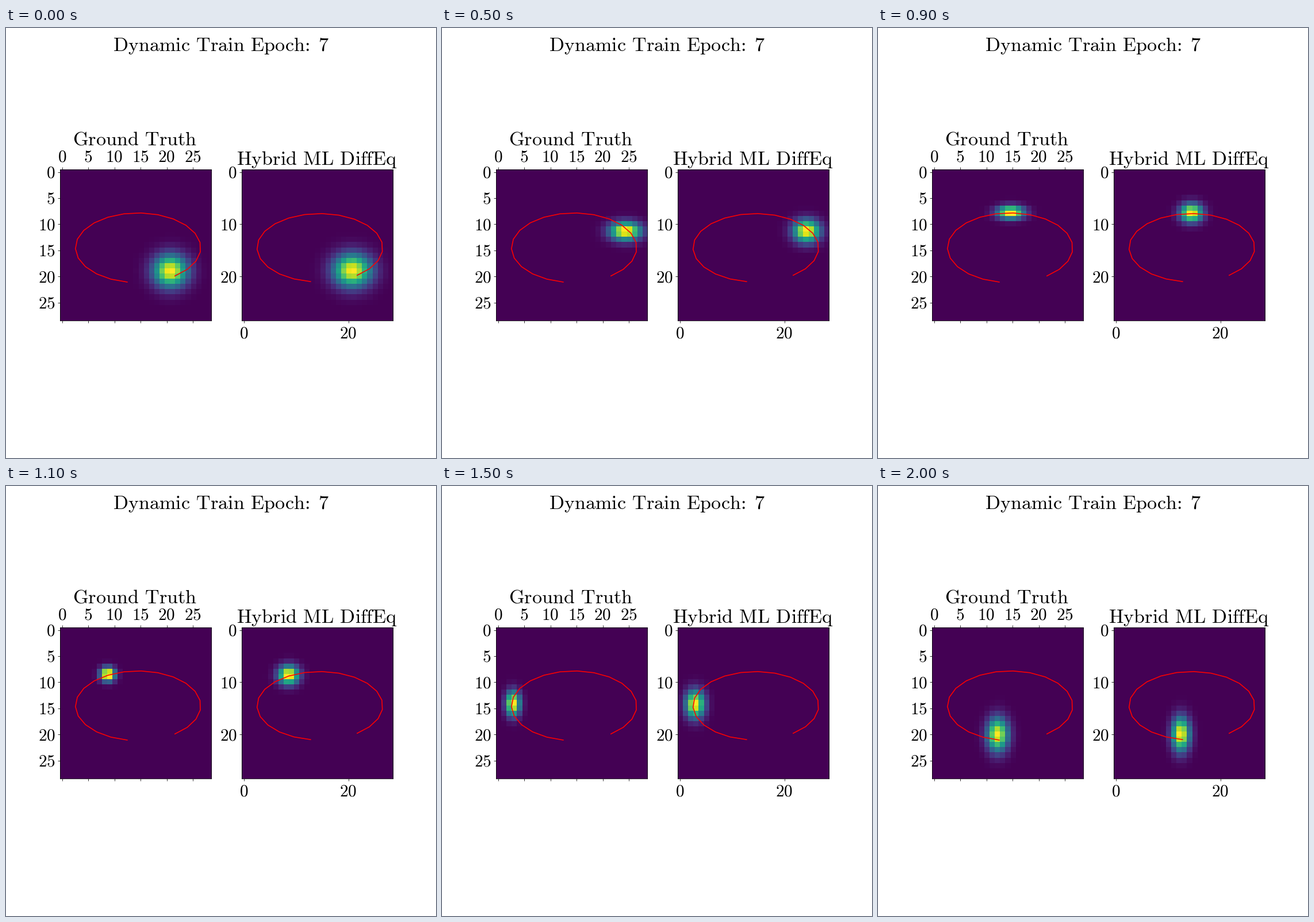
A matplotlib script for the animation above (2100 ms loop, 748 px wide and 748 px high).

```python
import numpy as np
import matplotlib.pyplot as plt
from matplotlib.animation import FuncAnimation

plt.rcParams["mathtext.fontset"] = "cm"

SIZE, DPI = 748, 72
FRAMES, INTERVAL = 21, 100
N = 29                      # grid cells per side
CELL = 9.085                # cell size in pixels
TOP = 246.0                 # upper edge of both panels
LEFTS = (93.5, 409.7)       # left edges of the panels
SIDE = N * CELL
TITLE, TICK = 34.2, 29.3    # font sizes

fig = plt.figure(figsize=(SIZE / DPI, SIZE / DPI), dpi=DPI, facecolor="white")


def label(x, y, text, size, ha="center"):
    """Roman text with its baseline at pixel (x, y)."""
    text = text.replace(":  ", r"\hspace{-0.2}:\hspace{0.306}")
    text = text.replace(" ", r"\hspace{0.38}")
    fig.text(x / SIZE, 1 - y / SIZE, rf"$\mathrm{{{text}}}$",
             fontsize=size, ha=ha, va="baseline")


def wave(pos, mean, amp, low, period):
    return mean - amp * np.cos(2 * np.pi * (pos - low) / period)


def orbit(angle, centre, a, b):
    return centre + a * np.cos(angle), centre - b * np.sin(angle)


def blob(x, y, sx, sy):
    g = np.arange(N)
    z = np.outer(np.exp(-((g - y) / sy) ** 2 / 2),
                 np.exp(-((g - x) / sx) ** 2 / 2))
    return z / z.max()


def truth(i):
    x, y = orbit(truth_angles[i], 14, 11.25, 6.2)
    return blob(x, y, wave(x, 1.52, 0.72, 5.5, 30), wave(y, 1.5, 0.7, 6, 30))


def hybrid(i):
    x, y = orbit(hybrid_angles[i], 14, 11.2, 6.1)
    return blob(x, y, 1.1 + 1.4 * np.exp(-i / 6.3), wave(y, 1.7, 0.52, 6.5, 28))


def panel(left, angles, a, b, xticks, yticks):
    ax = fig.add_axes([left / SIZE, 1 - (TOP + SIDE) / SIZE,
                       SIDE / SIZE, SIDE / SIZE])
    img = ax.imshow(np.zeros((N, N)), cmap="viridis", vmin=0, vmax=1,
                    interpolation="nearest", aspect="auto")
    ax.plot(*orbit(angles, 14.5, a, b), color="red", lw=1.6)
    ax.set(xlim=(-0.5, N - 0.5), ylim=(N - 0.5, -0.5),
           xticks=xticks, yticks=yticks)
    ax.tick_params(labelbottom=False, labelleft=False, length=3.7, width=0.8)
    for v in yticks:
        label(left - 7.8, TOP + (v + 0.5) * CELL + 10, str(v), TICK, "right")
    return ax, img


truth_angles = np.radians(np.linspace(-54, 260, FRAMES))
hybrid_angles = np.radians(np.linspace(-53.6, 261.5, FRAMES))

fives = range(0, 30, 5)
ax1, img1 = panel(LEFTS[0], truth_angles, 12, 6.67, fives, fives)
ax2, img2 = panel(LEFTS[1], hybrid_angles, 12.04, 6.55, (0, 20), (0, 10, 20))
ax1.tick_params(axis="x", top=True)

for v in fives:
    label(LEFTS[0] + (v + 0.5) * CELL - 0.6, 232.5, str(v), TICK)
for v in (0, 20):
    label(LEFTS[1] + (v + 0.5) * CELL - 0.6, 539, str(v), TICK)

label(SIZE / 2, 40, "Dynamic Train Epoch:  7", TITLE)
label(LEFTS[0] + SIDE / 2 - 1.2, 204, "Ground Truth", TITLE)
label(LEFTS[1] + SIDE / 2 - 0.8, 238.5, "Hybrid ML DiffEq", TITLE)


def update(i):
    img1.set_data(truth(i))
    img2.set_data(hybrid(i))
    return img1, img2


anim = FuncAnimation(fig, update, frames=FRAMES, interval=INTERVAL,
                     repeat=True, repeat_delay=0, blit=False)
plt.show()
```
